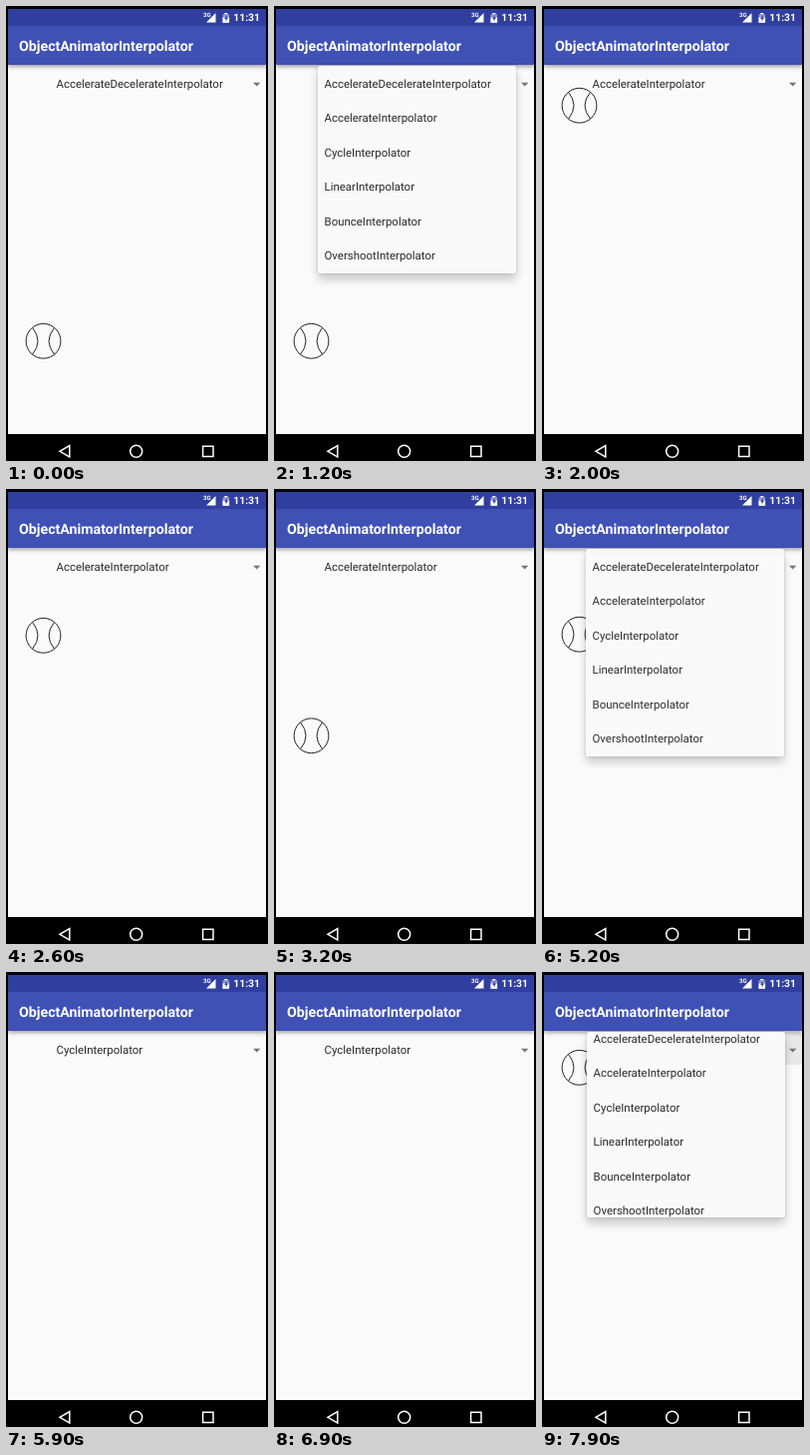
Recreate the animation shown at these times as an HTML page. Size 263 by 456 pixels, loop 8000 ms.

```html
<!DOCTYPE html>
<html lang="en">
<head>
<meta charset="utf-8">
<title>ObjectAnimatorInterpolator</title>
<style>
  html, body { margin: 0; width: 100%; height: 100%; overflow: hidden; background: #000; }
  #stage { position: relative; width: 263px; height: 456px; overflow: hidden;
    font-family: Roboto, sans-serif; font-size: 11.44px; color: #2a2a2a; text-rendering: geometricPrecision; }
  #stage div, svg { position: absolute; }
  #content { left: 2px; top: 59px; width: 259px; height: 370px; background: #fafafa; overflow: hidden; }
  #status { left: 2px; top: 3px; width: 259px; height: 17px; background: #303f9f; }
  #bar { left: 2px; top: 20px; width: 259px; height: 39px; background: #3f51b5;
    box-shadow: 0 2px 4px rgba(0,0,0,.35); clip-path: inset(0 0 -8px 0); }
  #title { left: 11px; top: .5px; line-height: 41px; color: #fff; font-size: 14.2px; font-weight: 600; white-space: nowrap; }
  #clock { right: 6px; top: 0; line-height: 18px; color: #fff; font-size: 10.4px; font-weight: 700; }
  #ripple { left: 52px; top: 2px; width: 207px; height: 32px; background: rgba(0,0,0,.07); border-radius: 2px; }
  #label { left: 48.5px; top: 1.5px; line-height: 34.5px; white-space: nowrap; }
  #popup { top: 60px; width: 199px; border-radius: 2px; background: #f9f9f9;
    box-shadow: 0 6px 10px rgba(0,0,0,.2), 0 0 3px rgba(0,0,0,.16); }
  #clip { inset: 0; overflow: hidden; }
  #list { left: 6.5px; top: .5px; line-height: 34.5px; white-space: nowrap; }
  #list p { margin: 0; height: 34.5px; }
  #icons { left: 0; top: 0; }
</style>
</head>
<body>
<div id="stage">
  <div id="content">
    <div id="ripple"></div>
    <div id="label"></div>
    <svg width="259" height="370" fill="none" stroke="#222" stroke-width="1">
      <path d="M246 17.8h7.4l-3.7 3.8z" fill="#757575" stroke="none"/>
      <g id="ball">
        <circle r="17.4"/>
        <path d="M-11 -13.4Q0 0 -11 13.4M11 -13.4Q0 0 11 13.4"/>
      </g>
    </svg>
  </div>
  <div id="status"><div id="clock">11:31</div></div>
  <div id="bar"><div id="title">ObjectAnimatorInterpolator</div></div>
  <div id="popup"><div id="clip"><div id="list"></div></div></div>
  <svg id="icons" width="263" height="456" fill="none" stroke="#fff" stroke-width="1.5">
    <g fill="#fff" stroke="none">
      <path d="M201 16.5L210.5 7V16.5z"/>
      <text x="198" y="11" font-size="6" font-weight="700">3G</text>
      <path d="M217.5 8.2h1.8v-1.2h3v1.2h1.8v8.5h-6.6z" opacity=".45"/>
      <path d="M217.5 11.5h6.6v5.2h-6.6zM219.3 7h3v1.2h-3z"/>
      <path d="M221.4 9l-2.2 4h1.5v2.6l2.2-4h-1.5z" fill="#303f9f"/>
    </g>
    <path d="M63.8 440.6V452L54 446.3z"/>
    <circle cx="130.7" cy="446.3" r="6"/>
    <path d="M197.6 441.2h10.4v10.4h-10.4z"/>
  </svg>
</div>
<script>
  const $ = id => document.getElementById(id);
  const LOOP = 8000, STEP = 100, RUN = 1800;
  const TOP = 96, DROP = 240;
  const STALL = 6400, LAG = 105;
  const names = ['AccelerateDecelerate', 'Accelerate', 'Cycle', 'Linear', 'Bounce', 'Overshoot']
    .map(n => n + 'Interpolator');
  const menus = [{ open: 770, pick: 1770 }, { open: 4241, pick: 5195 }, { open: 7720, pick: 9000 }];

  $('list').innerHTML = names.map(n => `<p>${n}</p>`).join('');

  const clamp = v => Math.min(1, Math.max(0, v));

  // cubic-bezier(.4, 0, .2, 1)
  function ease(x) {
    let lo = 0, hi = 1;
    for (let i = 0; i < 20; i++) {
      const s = (lo + hi) / 2, u = 1 - s;
      if (1.2 * s * u * u + .6 * s * s * u + s ** 3 < x) lo = s; else hi = s;
    }
    return 3 * lo * lo * (1 - lo) + lo ** 3;
  }

  function ballY(t) {
    const [a, b] = menus;
    if (t < a.pick) return TOP + DROP;
    if (t < b.pick) return TOP + DROP * clamp((t - a.pick) / RUN) ** 2;
    // the device stalls briefly during the cycling run
    const local = t < STALL ? t : Math.max(STALL, t - LAG);
    const k = clamp((local - b.pick) / RUN);
    return TOP + DROP * Math.sin(2 * Math.PI * 12 * k);
  }

  function drawMenu(t) {
    const m = menus.find(m => t >= m.open && t < m.pick + 200);
    $('popup').style.display = m ? '' : 'none';
    $('ripple').style.opacity = m ? clamp((t - m.open) / 100) * clamp((m.open + 420 - t) / 150) : 0;
    if (!m) return;
    const rest = 1 - ease(clamp((t - m.open) / 300));
    const p = $('popup').style;
    p.left = 44 + 9 * rest + 'px';
    p.height = 207.5 - 172 * rest + 'px';
    p.opacity = clamp((t - m.open) / 100) * clamp(1 - (t - m.pick) / 200);
    $('list').style.transform = `translateY(${-86 * rest}px)`;
  }

  function draw(now) {
    const t = Math.floor(now % LOOP / STEP) * STEP;
    $('label').textContent = names[menus.filter(m => t >= m.pick).length];
    $('ball').setAttribute('transform', `translate(35.5 ${ballY(t) - 59.2})`);
    drawMenu(t);
  }

  let start;
  function tick(now) {
    start ??= now;
    draw(now - start);
    requestAnimationFrame(tick);
  }
  draw(0);
  requestAnimationFrame(tick);
</script>
</body>
</html>
```
